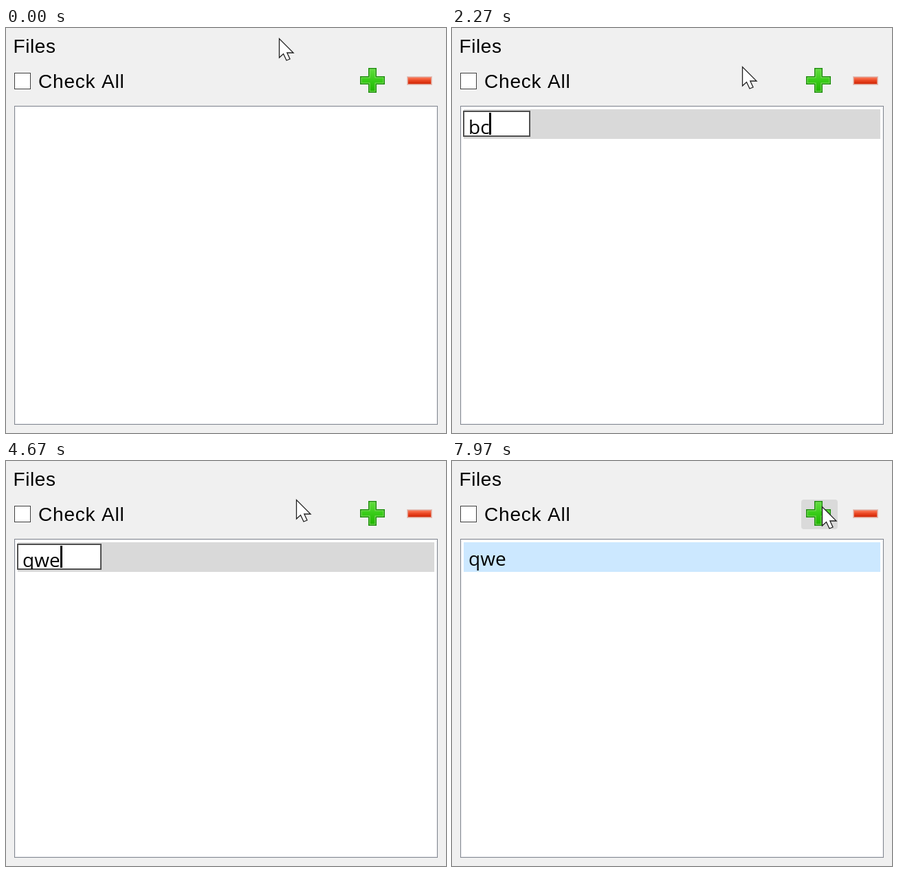
These frames come from a looping animation (640 px wide and 588 px high, 8 s). An HTML page with a canvas:

```html
<!DOCTYPE html>
<html lang="en">
<head>
<meta charset="utf-8">
<title>File list</title>
<style>
html, body { margin: 0; width: 100%; height: 100%; overflow: hidden; background: #f0f0f0; }
canvas { display: block; width: 640px; height: 588px; }
</style>
</head>
<body>
<canvas id="stage" width="640" height="588"></canvas>
<script>
const ctx = document.getElementById('stage').getContext('2d');
const LOOP = 8000;
const BG = '#f0f0f0', PAPER = '#ffffff', INK = '#000000';
const ACTIVE = '#cce8ff', INACTIVE = '#d9d9d9', HIGHLIGHT = '#0078d7';
const LABEL_FONT = '28px "Liberation Sans", Arial, sans-serif';
const ITEM_FONT = '28px "Open Sans", "Noto Sans", sans-serif';

// Pointer path: [time, x, y]
const pointer = [
  [0, 397, 15], [100, 397, 15], [900, 533, 91], [1350, 533, 91],
  [1800, 422, 56], [7350, 422, 56], [7940, 538, 66], [LOOP, 538, 66]
];

// Row states, each valid from its start time
const states = [
  { at: 0 },
  { at: 1200, text: 'abc', edit: true, selected: true, row: ACTIVE },
  { at: 1270, text: 'abc', edit: true, selected: true, caret: true, row: INACTIVE },
  { at: 2000, text: 'b', edit: true, caret: true, row: INACTIVE },
  { at: 2200, text: 'bc', edit: true, caret: true, row: INACTIVE },
  { at: 2400, text: 'bcd', edit: true, caret: true, row: INACTIVE },
  { at: 2900, text: 'bcd', row: ACTIVE },
  { at: 3500, text: 'bcd', edit: true, selected: true, caret: true, row: INACTIVE },
  { at: 4150, text: 'q', edit: true, caret: true, row: INACTIVE },
  { at: 4350, text: 'qw', edit: true, caret: true, row: INACTIVE },
  { at: 4530, text: 'qwe', edit: true, caret: true, row: INACTIVE },
  { at: 4930, text: 'qwe', row: ACTIVE }
];

const last = (list, test) => list.filter(test).pop();

function rect(x, y, w, h, color) {
  ctx.fillStyle = color;
  ctx.fillRect(x, y, w, h);
}

function frame(x, y, w, h, color) {
  ctx.strokeStyle = color;
  ctx.lineWidth = 1;
  ctx.strokeRect(x + 0.5, y + 0.5, w - 1, h - 1);
}

function text(str, x, y, font, color, spacing = 0) {
  ctx.font = font;
  ctx.letterSpacing = spacing + 'px';
  ctx.fillStyle = color;
  ctx.fillText(str, x, y);
  ctx.letterSpacing = '0px';
}

function gradient(y0, y1, ...colors) {
  const g = ctx.createLinearGradient(0, y0, 0, y1);
  colors.forEach((c, i) => g.addColorStop(i / (colors.length - 1), c));
  return g;
}

function polygon(points) {
  ctx.beginPath();
  points.forEach(([x, y]) => ctx.lineTo(x, y));
  ctx.closePath();
}

function pointerAt(t) {
  const i = pointer.findIndex(p => p[0] > t);
  const [t0, x0, y0] = pointer[i - 1], [t1, x1, y1] = pointer[i];
  const u = (t - t0) / (t1 - t0);
  const k = u * u * (3 - 2 * u);
  return [Math.round(x0 + (x1 - x0) * k), Math.round(y0 + (y1 - y0) * k)];
}

function drawPlus() {
  const cross = (inset, color) => {
    const w = 12 - 2 * inset, l = 36 - 2 * inset;
    ctx.fillStyle = color;
    ctx.beginPath();
    ctx.rect(527 + inset, 58 + inset, w, l);
    ctx.rect(515 + inset, 70 + inset, l, w);
    ctx.fill();
  };
  cross(0, '#1f8f0e');
  cross(1.5, '#84e264');
  cross(2.5, gradient(60, 92, '#5fdc3c', '#38cc18', '#1fb400'));
}

function drawMinus() {
  rect(583, 70, 37, 13, '#e6c8c0');
  rect(584, 71, 35, 11, '#e29a8c');
  rect(585, 72, 33, 9, gradient(72, 81, '#fa7a58', '#ea4420', '#d02808'));
}

function drawPointer(x, y) {
  ctx.save();
  ctx.translate(x + 0.5, y + 0.5);
  polygon([[0, 0], [0, 27.5], [6, 22], [10.5, 31.5], [15.5, 29.5], [11.3, 20.5], [20.5, 20.5]]);
  ctx.fillStyle = PAPER;
  ctx.fill();
  ctx.strokeStyle = '#202020';
  ctx.lineWidth = 1.3;
  ctx.stroke();
  ctx.restore();
}

function drawEditor(state, t) {
  ctx.font = ITEM_FONT;
  const width = Math.round(ctx.measureText(state.text).width);
  const boxWidth = width + 67;
  rect(16, 120, boxWidth + 1, 38, '#505050');
  rect(18, 122, boxWidth - 3, 34, PAPER);
  ctx.save();
  ctx.beginPath();
  ctx.rect(18, 122, boxWidth - 3, 35);
  ctx.clip();
  if (state.selected) rect(24, 123, width, 34, HIGHLIGHT);
  text(state.text, 24, 154, ITEM_FONT, state.selected ? PAPER : INK);
  const lit = Math.floor((t - state.at) / 530) % 2 === 0;
  if (state.caret && lit) rect(24 + width, 123, 3, 32, state.selected ? '#ff8728' : INK);
  ctx.restore();
}

function drawRow(state, t) {
  if (!state.text) return;
  rect(17, 118, 606, 43, state.row);
  if (state.edit) drawEditor(state, t);
  else text(state.text, 24, 152, ITEM_FONT, INK);
}

function draw(t) {
  const [px, py] = pointerAt(t);
  rect(0, 0, 640, 588, BG);
  text('Files', 10.5, 36, LABEL_FONT, INK, 0.6);
  rect(12, 65, 24, 24, PAPER);
  frame(12, 65, 24, 24, '#404040');
  text('Check All', 47, 87, LABEL_FONT, INK, 0.8);

  if (px >= 508 && px < 561 && py >= 56 && py < 99) {
    ctx.fillStyle = '#dadada';
    ctx.beginPath();
    ctx.roundRect(508, 56, 53, 43, 4);
    ctx.fill();
  }
  drawPlus();
  drawMinus();

  rect(12, 113, 616, 463, PAPER);
  frame(12, 113, 616, 463, '#828790');
  frame(13, 114, 614, 461, '#f0f0f4');
  drawRow(last(states, s => s.at <= t), t);
  drawPointer(px, py);
}

const start = performance.now();
function tick() {
  draw((performance.now() - start) % LOOP);
  requestAnimationFrame(tick);
}
tick();
</script>
</body>
</html>
```
